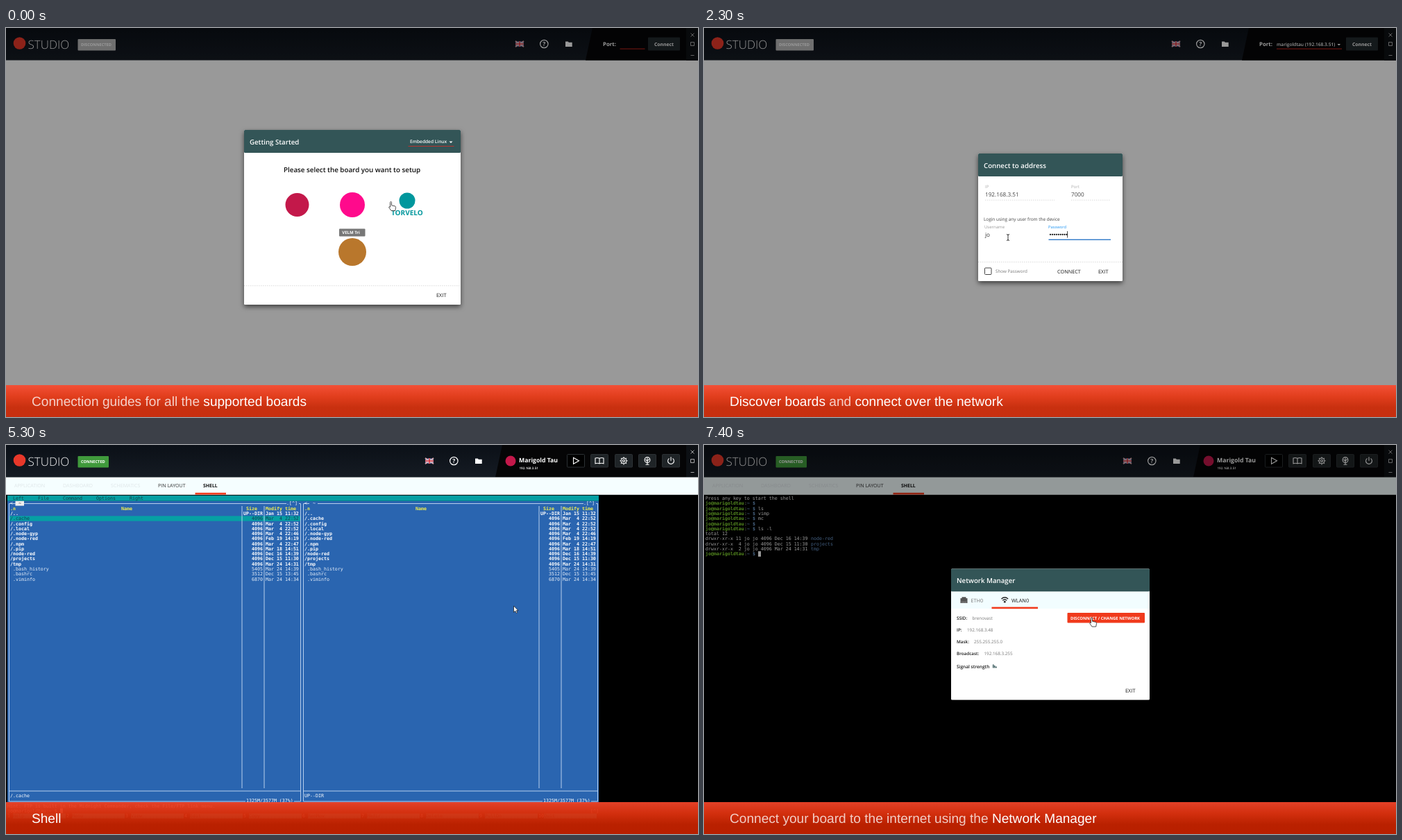
An HTML page for the animation above (8000 ms loop, 997 px wide and 561 px high).

```html
<!DOCTYPE html>
<html lang="en">
<head>
<meta charset="utf-8">
<title>Board studio tour</title>
<style>
  html, body { margin: 0; width: 100%; height: 100%; overflow: hidden; background: #000; }
  svg { display: block; position: absolute; left: 0; top: 0; }
  text { font-family: "Open Sans", "Noto Sans", sans-serif; white-space: pre; text-rendering: geometricPrecision; }
  .mono { font-family: "DejaVu Sans Mono", monospace; font-size: 6.645px; }
  .caption { font-family: "Liberation Sans", Arial, sans-serif; font-size: 19.1px; }
</style>
</head>
<body>
<svg id="stage" width="997" height="561" viewBox="0 0 997 561">
  <defs>
    <linearGradient id="red" x2="0" y2="1">
      <stop offset="0" stop-color="#f2452a"/>
      <stop offset=".35" stop-color="#e0320f"/>
      <stop offset=".7" stop-color="#c52300"/>
      <stop offset="1" stop-color="#c42100"/>
    </linearGradient>
    <linearGradient id="bar" x2="0" y2="1">
      <stop offset="0" stop-color="#0b1017"/>
      <stop offset="1" stop-color="#151b23"/>
    </linearGradient>
    <filter id="shadow" x="-10%" y="-10%" width="120%" height="125%">
      <feDropShadow dx="0" dy="3" stdDeviation="3.5" flood-opacity=".6"/>
    </filter>
  </defs>
</svg>
<script>
const LOOP = 8000;
const RED = '#f03a1c', TEAL = '#335557', INK = '#1a1a1a', GREY = '#777', BOARD = '#c3184a';

const rect = (x, y, w, h, fill, more = '') =>
  `<rect x="${x}" y="${y}" width="${w}" height="${h}" fill="${fill}" ${more}/>`;
const text = (x, y, s, size, fill, weight = 400) =>
  `<text x="${x}" y="${y}" font-size="${size}" fill="${fill}" font-weight="${weight}">${s}</text>`;
const path = (d, stroke, width = 1, more = 'fill="none"') =>
  `<path d="${d}" stroke="${stroke}" stroke-width="${width}" ${more}/>`;
const shape = (d, fill) => `<path d="${d}" fill="${fill}"/>`;
const dot = (x, y, r, fill, more = '') => `<circle cx="${x}" cy="${y}" r="${r}" fill="${fill}" ${more}/>`;
const at = (x, y, s) => `<g transform="translate(${x} ${y})">${s}</g>`;
const dotted = (x1, x2, y) => path(`M${x1} ${y}H${x2}`, '#ccc', .7, 'stroke-dasharray="1.5 1.5"');
const dim = rect(0, 0, 997, 515, '#000', 'opacity=".4"');

// Terminal text on a grid of 4 x 7.27 px cells
const ROW = 7.27;
const cell = (col, row, s, fill, weight = 400) =>
  `<text class="mono" x="${2 + 4 * col}" y="${79.2 + ROW * row}" fill="${fill}" font-weight="${weight}">${s}</text>`;

const flag = rect(-6, -4, 12, 8, '#2b3a78') +
  path('M-6 -4L6 4M6 -4L-6 4', '#eee', 1.8) + path('M-6 -4L6 4M6 -4L-6 4', '#d33', .6) +
  path('M0 -4V4M-6 0H6', '#eee', 2.8) + path('M0 -4V4M-6 0H6', '#d22b3a', 1.5);

const hand = path('M-3 -7c0-1.4 2-1.4 2 0v4.3l4.6 1c1.4.4 1.6 1.2 1.4 2.4l-.8 4.3h-5.6l-3.2-4.4c-.7-1.2.5-1.8 1.6-.8z',
  '#222', .8, 'fill="#fff"');
const arrow = path('M-1.5 -5V4.2L.7 2.3L2.2 5.4L3.7 4.7L2.3 1.7H5z', '#111', .7, 'fill="#fff"');
const beam = path('M-2 -4.5Q0 -4.5 0 -3Q0 -4.5 2 -4.5M0 -3.5V3.5M-2 4.5Q0 4.5 0 3Q0 4.5 2 4.5', '#222', .9);

function header(x, status, color, width, tools) {
  return rect(0, 0, 997, 46.5, 'url(#bar)') +
    shape(`M${x + 105} 0H997V46.5H${x + 95}z`, '#050506') +
    rect(980, 0, 17, 46.5, '#0d1014') +
    path('M986.5 7.5l5 5m0-5l-5 5M986.5 20.5h5v5h-5zM986.5 39.5h5', '#ccc', .8) +
    dot(19.5, 22, 8.8, '#e8382a') +
    text(31.5, 29.5, 'STUDIO', 17, '#f4f4f4', 300) +
    rect(103.5, 16, width, 16.5, color, 'rx="1"') +
    text(108, 26.3, status, 5.7, '#fff', 700) +
    at(x, 23, flag) +
    dot(x + 35.3, 23, 5.7, 'none', 'stroke="#fff" stroke-width="1.2"') +
    text(x + 33.2, 26.2, '?', 8.5, '#fff', 700) +
    shape(`M${x + 66} 19.5h3.7l1.2 1.2h4.8v6.3h-9.7z`, '#fff') + tools;
}

function portTools(x, value, lineX, lineW) {
  return text(x, 25.5, 'Port:', 7.8, '#fff', 700) + value +
    rect(lineX, 29.6, lineW, .9, '#e02b20') +
    rect(925, 13.5, 46, 19, '#22292d', 'rx="1"') +
    text(934, 25.6, 'Connect', 6.8, '#fff', 700);
}

function boardTools() {
  const xs = [808, 842, 877, 911, 945];
  const teeth = [...Array(8)].map((_, i) => `<path d="M0 -4V-5.6" transform="rotate(${i * 45})"/>`).join('');
  const line = s => `<g fill="none" stroke="#fff" stroke-width="1.1">${s}</g>`;
  const icons = [
    line('<path d="M-3.5 -4.5L4.5 0L-3.5 4.5z"/>'),
    line('<path d="M0 -3.5Q-3 -4.8 -6 -3.8V4Q-3 3 0 4Q3 3 6 4V-3.8Q3 -4.8 0 -3.5V4"/>'),
    line('<circle r="3.9"/><circle r="1.6"/>' + teeth),
    line('<circle cy="-1.3" r="3.9"/><path d="M0 -4V5.5M-2.6 -2L0 .5L2.6 -2.5M-2.5 5.5H2.5"/>'),
    line('<path d="M-2.6 -3.4A4.4 4.4 0 1 0 2.6 -3.4M0 -5.5V0"/>')
  ];
  return dot(727, 23, 7.5, BOARD) +
    text(739, 25.3, 'Marigold Tau', 8.7, '#fff', 700) +
    text(739.5, 34.8, '192.168.3.51', 4.6, '#fff', 600) +
    xs.map((x, i) => rect(x + .5, 13.5, 25, 18.5, i ? '#1f2427' : '#000', 'rx="1" stroke="#2c3134"') +
      at(x + 13, 22.8, icons[i])).join('');
}

const tabs = rect(0, 46.5, 997, 25.3, '#f5feff') +
  [[12, 'APPLICATION'], [82, 'DASHBOARD'], [151, 'SCHEMATICS']]
    .map(([x, s]) => text(x, 61.3, s, 7.15, '#dfe6e8')).join('') +
  text(219, 61.3, 'PIN LAYOUT', 7.1, '#333') +
  text(284, 61.3, 'SHELL', 6.9, '#111', 700) +
  rect(272.5, 68.8, 44.5, 2.7, RED);

const dialog = (x, y, w, h, title) =>
  `<g filter="url(#shadow)">${rect(x, y, w, h, '#fff', 'rx="1.5"')}</g>` +
  rect(x, y, w, 33, TEAL, 'rx="1.5"') +
  text(x + 8, y + 20.7, title, 9.7, '#fff', 600);

const banner = parts => rect(0, 515, 997, 46, 'url(#red)', 'opacity=".94"') +
  `<text class="caption" x="37" y="544.6" fill="#fff">` +
  parts.map(([s, strong]) => `<tspan fill-opacity="${strong ? 1 : .77}">${s}</tspan>`).join('') + '</text>';

function boardsScene() {
  return rect(0, 0, 997, 561, '#fff') +
    header(740, 'DISCONNECTED', '#b9b9b9', 54.5, portTools(860, '', 884.5, 36)) + dim +
    dialog(343, 147, 312, 252, 'Getting Started') +
    text(582, 166.3, 'Embedded Linux', 6.6, '#fff', 600) +
    shape('M638.5 163.5h5l-2.5 2.5z', '#fff') + rect(579.5, 170, 66, .9, '#c9302c') +
    text(400, 207.6, 'Please select the board you want to setup', 9.8, '#111', 600) +
    dot(419.5, 255, 17, BOARD) +
    dot(499, 255, 18, '#ff0a8c') +
    dot(578, 249, 11.5, '#00979d') +
    text(555, 269.7, 'TORVELO', 10, '#00979d', 700) +
    dot(499, 323, 20, '#b9772c') +
    rect(480, 289.5, 37.5, 11, '#777', 'rx="1"') +
    text(484.3, 297.2, 'VELM Tri', 6, '#fff', 700) +
    dotted(343, 655, 371.7) + text(620, 388, 'EXIT', 7.4, INK) +
    at(556.5, 258.5, hand) +
    banner([['Connection guides for all the '], ['supported boards', 1]]);
}

function loginScene() {
  const value = text(825, 25.6, 'marigoldtau (192.168.3.51)', 6.6, '#fff', 600) +
    shape('M912.5 23h4.6l-2.3 2.3z', '#fff');
  const bullets = [...Array(9)].map((_, i) => dot(499 + i * 2.93, 297.8, 1.15, '#111')).join('');
  return rect(0, 0, 997, 561, '#fff') +
    header(680, 'DISCONNECTED', '#b9b9b9', 54.5, portTools(800, value, 825, 94)) + dim +
    dialog(395, 181, 208, 184, 'Connect to address') +
    text(405, 230.5, 'IP', 6, '#aaa') + text(405, 243, '192.168.3.51', 8.2, '#444') +
    text(529, 230.5, 'Port', 6, '#aaa') + text(529, 243, '7000', 8.2, '#444') +
    dotted(405, 505, 248.2) + dotted(529, 586, 248.2) +
    text(403, 278.2, 'Login using any user from the device', 6.43, '#444') +
    text(404, 288.5, 'Username', 6, '#999') + text(405, 300.7, 'jo', 8.2, '#333') +
    text(496, 288.5, 'Password', 5.8, '#2196f3') + bullets +
    rect(523.3, 293, .8, 9.5, '#111') + rect(496.5, 304.6, 89.5, 1.3, '#1f6fc4') +
    dotted(395, 603, 337.5) +
    rect(404.5, 346, 9.5, 9.5, '#fff', 'stroke="#444" rx="1"') +
    text(420, 352.9, 'Show Password', 6.3, GREY) +
    text(509, 353.7, 'CONNECT', 7.3, INK) + text(568, 353.7, 'EXIT', 7.4, INK) +
    at(438, 302, beam) +
    banner([['Discover boards', 1], [' and '], ['connect over the network', 1]]);
}

const files = `/..|UP--DIR|Jan 15 11:32
/.cache|4096|Mar  4 22:52
/.config|4096|Mar  4 22:52
/.local|4096|Mar  4 22:52
/.node-gyp|4096|Mar  4 22:46
/.node-red|4096|Feb 19 14:19
/.npm|4096|Mar  4 22:47
/.pip|4096|Mar 18 14:51
/node-red|4096|Dec 16 14:39
/projects|4096|Dec 15 11:30
/tmp|4096|Mar 24 14:31
 .bash_history|5405|Mar 24 14:39
 .bashrc|3512|Dec 15 13:45
 .viminfo|6870|Mar 24 14:34`.split('\n').map(s => s.split('|'));

// "left" is the first column of the panel, "right" the start of its last 106 columns
function panel(left, right, active) {
  const x = left * 4, end = right * 4, line = '#c8dcf4';
  let s = path(`M${x + 4.5} 84.5H${end + 424.5}V514H${x + 4.5}zM${x + 4} 499H${end + 424}`, line, .9) +
    path(`M${end + 340} 88V495M${end + 372} 88V495`, line, .9) +
    rect(end + 404, 81, 18, 7, '#2a65b0') + cell(right + 100.5, 1, '.[^]', '#fff') +
    cell(left + 1, 1, '&lt;', '#fff');
  s += active ? rect(13.5, 80.8, 12.5, 6.8, '#eee') + cell(4, 1, '~', '#222')
    : rect(x + 13, 81, 12, 7, '#2a65b0') + cell(left + 4, 1, '~', '#fff');
  for (const [c, word] of [[left + 1, '.n'], [left + 41, 'Name'], [right + 86, 'Size'], [right + 93, 'Modify time']])
    s += cell(c, 2, word, '#f5f04c', 700);
  files.forEach(([name, size, date], i) => {
    const on = active && i === 1, dir = name[0] === '/';
    if (on) s += rect(5, 102.4, 419, ROW, '#06a0a4') + path('M340 102.4v7.3M372 102.4v7.3', line, .9);
    const ink = on ? '#123c50' : dir ? '#fff' : '#eaf1fa', weight = dir && !on ? 700 : 400;
    s += cell(left + 1, i + 3, name, ink, weight) +
      cell(right + 92 - size.length, i + 3, size, ink, weight) +
      cell(right + 93, i + 3, date, ink, weight);
  });
  return s + cell(left + 1, 59, active ? '/.cache' : 'UP--DIR', '#fff') +
    rect(end + 345, 510, 70, 7, '#2a65b0') + cell(right + 86, 60, '1325M/3577M (37%)', '#fff');
}

function commanderScene() {
  const menu = [[2, 'Left'], [11, 'File'], [20, 'Command'], [32, 'Options'], [44, 'Right']];
  const keys = ['Help', 'Menu', 'View', 'Edit', 'Copy', 'RenMov', 'Mkdir', 'Delete', 'PullDn', 'Quit'];
  return rect(0, 0, 997, 561, '#000') +
    header(610, 'CONNECTED', '#409a3c', 44.5, boardTools()) + tabs +
    rect(2, 72.8, 852, 8, '#06a0a4') + rect(2, 80.8, 852, 435.7, '#2a65b0') +
    menu.map(([c, s]) => cell(c, 0, s, '#124048')).join('') +
    panel(0, 0, true) + panel(106, 107, false) +
    cell(0, 61, 'Hint: FTP is built in the Midnight Commander, check the File/FTP link menu.', '#ddd') +
    cell(0, 62, 'jo@marigoldtau:~ $', '#ddd') + rect(78, 524, 4, 7, '#ddd') + cell(210, 62, '[^]', '#ddd') +
    keys.map((k, i) => rect(10 + i * 85, 531.5, 76, 7, '#06a0a4') +
      cell(i * 21.25, 63, i + 1, '#ddd') + cell(2 + i * 21.25, 63, k, '#000')).join('') +
    at(733, 237, arrow) + banner([['Shell', 1]]);
}

function networkScene() {
  const commands = ['', 'ls', 'vimp', 'mc', '', 'ls -l'];
  const prompt = (row, cmd) => cell(0, row, 'jo@marigoldtau', '#8ae234', 700) + cell(14, row, ':', '#ddd') +
    cell(15, row, '~ $', '#729fcf', 700) + cell(19, row, cmd, '#fff');
  const dirs = [['11', 'Dec 16 14:39', 'node-red'], [' 4', 'Dec 15 11:30', 'projects'], [' 2', 'Mar 24 14:31', 'tmp']];
  const facts = [['SSID:', 386.5, 'brenovast', 252], ['IP:', 379, '192.168.3.48', 269],
    ['Mask:', 389, '255.255.255.0', 286], ['Broadcast:', 403.5, '192.168.3.255', 303.2]];
  return rect(0, 0, 997, 561, '#000') +
    header(610, 'CONNECTED', '#409a3c', 44.5, boardTools()) + tabs +
    cell(0, 0, 'Press any key to start the shell', '#fff') +
    commands.map((c, i) => prompt(i + 1, c)).join('') +
    cell(0, 7, 'total 12', '#fff') +
    dirs.map(([n, date, name], i) => cell(0, 8 + i, `drwxr-xr-x ${n} jo jo 4096 ${date}`, '#fff') +
      cell(38, 8 + i, name, '#6f9fd8')).join('') +
    prompt(11, '') + rect(78, 153.2, 4, 7.8, '#fff') + dim +
    dialog(356, 178.5, 286, 189, 'Network Manager') +
    rect(356, 211.5, 286, 24.5, '#f2fdff') +
    shape('M369.5 221h2v-1.7h6v1.7h2v7h-10z', '#555') + path('M372 225.5v2.5m2.5-2.5v2.5m2.5-2.5v2.5', '#bbb', .7) +
    text(384.5, 226.7, 'ETH0', 7.3, GREY) +
    path('M428.5 222Q433.3 217.6 438.1 222M430.3 224.2Q433.3 221.4 436.3 224.2', '#222', 1.4) + dot(433.3, 226.2, 1.4, '#222') +
    text(443, 226.7, 'WLAN0', 7.4, INK) + rect(414.5, 233.6, 66.5, 2.6, RED) +
    facts.map(([k, x, v, y]) => text(364, y, k, 6.3, INK, 600) + text(x, y, v, 6.3, GREY)).join('') +
    text(364, 321.5, 'Signal strength', 6.55, INK, 600) +
    rect(416, 316.5, 1.4, 5, '#335557') + rect(418, 318, 1.4, 3.5, '#335557') + rect(420, 319.5, 1.6, 2, '#335557') +
    rect(523.5, 242, 111.5, 14.5, RED, 'rx="1"') +
    text(528, 251.5, 'DISCONNECT / CHANGE NETWORK', 5.95, '#fff', 700) +
    text(607, 356.8, 'EXIT', 7.4, INK) + at(560.5, 257, hand) +
    banner([['Connect your board to the internet using the '], ['Network Manager', 1]]);
}

const steps = [
  [0, 500, boardsScene],
  [500, 3500, loginScene],
  [3500, 6500, commanderScene],
  [6500, 8000, networkScene]
];

const stage = document.getElementById('stage');
for (const [start, end, draw] of steps) {
  const g = document.createElementNS('http://www.w3.org/2000/svg', 'g');
  g.innerHTML = draw();
  stage.append(g);
  const key = (ms, opacity) => ({ offset: ms / LOOP, opacity, easing: 'step-end' });
  g.animate([key(0, start ? 0 : 1), key(start, 1), key(end, 0), key(LOOP, 0)],
    { duration: LOOP, iterations: Infinity });
}
</script>
</body>
</html>
```
